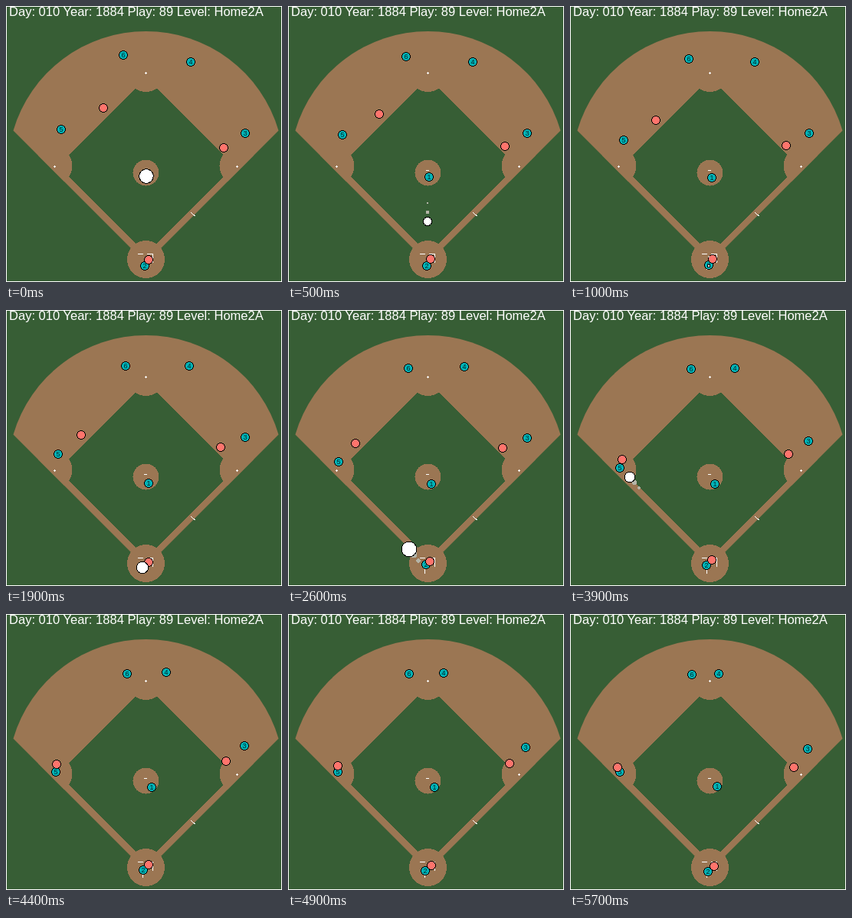
Animation of 360x360 px, one loop 5800 ms. Source, as an HTML page:

```html
<!DOCTYPE html>
<html lang="en">
<head>
<meta charset="utf-8">
<title>Ball game replay</title>
<style>
  html, body { margin: 0; width: 100%; height: 100%; overflow: hidden; background: #375e35; }
  svg { display: block; width: 100%; height: 100%; }
  text { font-family: "Liberation Sans", Arial, sans-serif; }
  .dirt { fill: #9b7653; }
  .grass { fill: #375e35; }
  .chalk { fill: none; stroke: #fff; }
  .actor { stroke: #000; }
  .actor + text { font-size: 9px; text-anchor: middle; fill: #002a30; }
</style>
</head>
<body>
<svg viewBox="0 0 360 360" shape-rendering="crispEdges">
  <clipPath id="fair"><path d="M9.500 162.500A180.300 180.300 0 0 1 355.500 162.500L182.500 335.500Z"/></clipPath>
  <g clip-path="url(#fair)">
    <rect class="dirt" width="360" height="360"/>
    <path class="grass" d="M182.500 93.500l115 115l-115 115l-115-115Z"/>
    <g class="dirt">
      <circle cx="62" cy="208.500" r="24.500"/>
      <circle cx="303" cy="208.500" r="24.500"/>
      <circle cx="182.500" cy="87.500" r="24.500"/>
    </g>
  </g>
  <circle class="dirt" cx="182.500" cy="217.500" r="17"/>
  <circle class="dirt" cx="182.500" cy="330.500" r="24.500"/>
  <path class="chalk" d="M180 214.500h4M241.500 269.500l5 4.500M172 323.500h7M184 323.500h7.500v11M178.500 337v7"/>
  <path class="chalk" d="M181 87.500h3m-1.500-1.500v3M62 209.500h3m-1.500-1.500v3M300 209.500h3m-1.500-1.500v3"/>
  <rect class="chalk" x=".5" y=".5" width="359" height="359"/>
  <text x="4" y="13" font-size="16.55" fill="#fff">Day: 010 Year: 1884 Play: 89 Level: Home2A</text>
  <g id="actors"></g>
</svg>
<script>
const LOOP = 5800, STEP = 100, LAST = LOOP - STEP;
const CYAN = "#00b2b5", RED = "#ff746c";

const layer = document.getElementById("actors");
function add(tag, attrs) {
  const el = document.createElementNS("http://www.w3.org/2000/svg", tag);
  set(el, attrs);
  return layer.appendChild(el);
}
function set(el, attrs) {
  for (const key in attrs) el.setAttribute(key, attrs[key]);
}

// A route is a few stops [time, x, y], run at steady speed from one to the next.
const players = [];
function addPlayer(fill, label, ...route) {
  const circle = add("circle", { class: "actor", r: 5.5, fill });
  const text = add("text", {});
  text.textContent = label;
  players.push({ route, circle, text });
}
addPlayer(CYAN, "1", [0, 183, 222], [3000, 188, 228], [LAST, 192, 225]);
addPlayer(CYAN, "2", [600, 181, 339], [2600, 180, 332], [3900, 178, 333], [LAST, 180, 336]);
addPlayer(CYAN, "3", [2300, 312, 166], [LAST, 310, 176]);
addPlayer(CYAN, "4", [1700, 241, 73], [LAST, 194, 78]);
addPlayer(CYAN, "5", [0, 72, 161], [3150, 65, 206]);
addPlayer(CYAN, "6", [0, 153, 64], [2600, 157, 76], [LAST, 159, 79]);
addPlayer(RED, "", [0, 127, 133], [3900, 68, 195], [LAST, 62, 200]);
addPlayer(RED, "", [0, 284, 185], [2300, 279, 178], [LAST, 292, 200]);
addPlayer(RED, "", [0, 186, 331], [3900, 185, 326], [LAST, 188, 329]);

const trail = [0.27, 0.45].map(scale => ({ scale, dot: add("circle", { fill: "#b4b4a8" }) }));
const ball = add("circle", { class: "actor", fill: "#fff" });

const mix = (a, b, u) => a + (b - a) * u;

function along(route, t) {
  const next = route.findIndex(stop => stop[0] > t);
  if (next <= 0) return route.at(next).slice(1);
  const [t0, x0, y0] = route[next - 1], [t1, x1, y1] = route[next];
  const u = (t - t0) / (t1 - t0);
  return [Math.round(mix(x0, x1, u)), Math.round(mix(y0, y1, u))];
}

// The ball's size follows its height: a falling pitch, then a lobbed throw.
function pitch(t) {
  const u = t / 1000;
  return { x: mix(183, 181, u), y: mix(222, 339, u), r: mix(9.3, 2, u), start: 0 };
}
function lob(t) {
  const start = 2270, u = Math.max(0, (t - start) / 1830);
  return { x: mix(178, 66, u), y: mix(336, 203.5, u), r: 7.7 + 16 * u - 19 * u * u, start };
}
function ballAt(t) {
  if (t <= 1000) return pitch(t);
  if (t >= 1900 && t <= 4100) return lob(t);
  return null;
}

function place(circle, spot, r) {
  circle.style.display = spot ? "" : "none";
  if (spot) set(circle, { cx: Math.round(spot.x), cy: Math.round(spot.y), r });
}

function draw(t) {
  for (const { route, circle, text } of players) {
    const [x, y] = along(route, t);
    set(circle, { cx: x, cy: y });
    set(text, { x, y: y + 3 });
  }
  const now = ballAt(t);
  place(ball, now, now?.r);
  trail.forEach(({ scale, dot }, i) => {
    const past = t - (trail.length - i) * STEP;
    const spot = now && past >= now.start ? ballAt(past) : null;
    place(dot, spot, now && Math.max(0.6, now.r * scale));
  });
}

let origin;
function tick(now) {
  origin ??= now;
  draw(Math.floor(((now - origin) % LOOP) / STEP) * STEP);
  requestAnimationFrame(tick);
}
draw(0);
requestAnimationFrame(tick);
</script>
</body>
</html>
```
